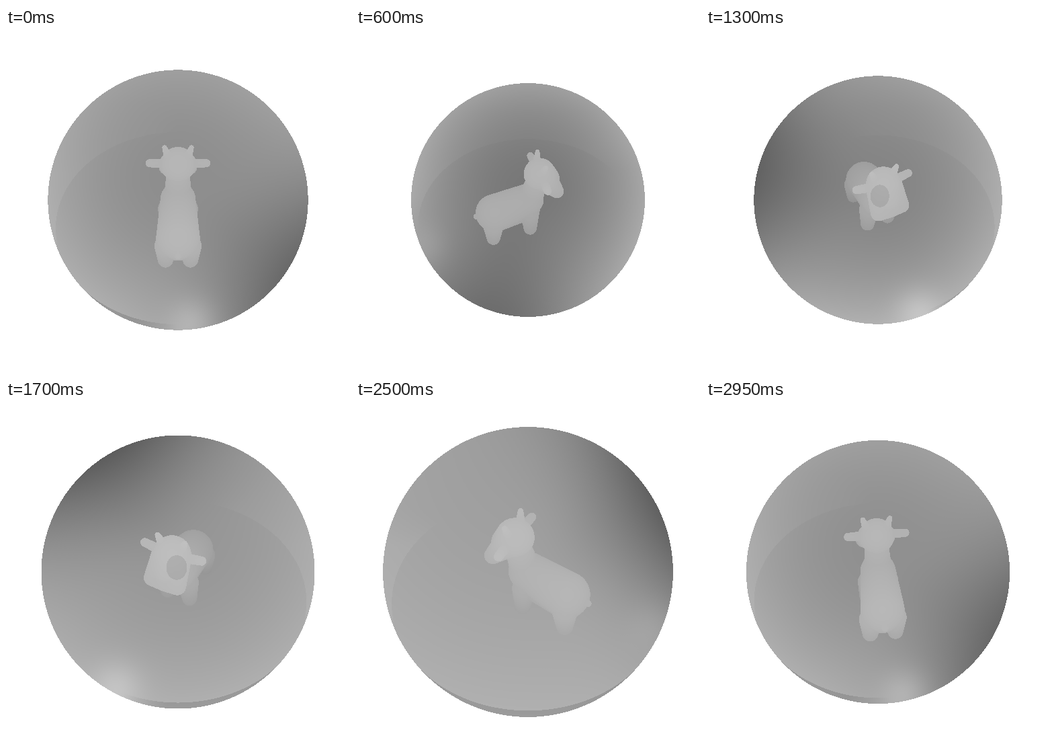
Recreate the animation shown at these times as an HTML page with a canvas. Size 512 by 512 pixels, loop 3 s.

```html
<!DOCTYPE html>
<html lang="en">
<head>
<meta charset="utf-8">
<title>Depth turntable</title>
<style>
html, body { margin: 0; width: 100%; height: 100%; overflow: hidden; background: #fff; }
canvas { display: block; width: 512px; height: 512px; }
</style>
</head>
<body>
<canvas id="stage" width="512" height="512"></canvas>
<script>
const SIZE = 512, MID = 256, LOOP = 3000, STEP = 50, BINS = 720;
const TAU = Math.PI * 2;
const ctx = document.getElementById('stage').getContext('2d');
const img = ctx.createImageData(SIZE, SIZE);
const px = new Uint32Array(img.data.buffer);
const depth = new Float32Array(SIZE * SIZE);

// Camera: fixed elevation, distance in model units
const ELEV = 51 * Math.PI / 180, SE = Math.sin(ELEV), CE = Math.cos(ELEV), DIST = 5;

const mix = (a, b, k) => a + (b - a) * k;
const clamp = (v, a, b) => Math.min(b, Math.max(a, v));
const ramp = (a, b, v) => clamp((v - a) / (b - a), 0, 1);
const grey = v => 0xff000000 | clamp(Math.round(v), 0, 255) * 0x10101;

// Each limb sweeps between two balls: side, up, forward, radius
const limbs = {
  back: [[0, .02, 0, .28], [0, -.12, -.63, .33]],
  belly: [[0, -.18, -.02, .25], [0, -.24, -.64, .28]],
  neck: [[0, .06, .05, .22], [0, .42, .15, .18]],
  head: [[0, .6, .2, .26], [0, .44, .34, .21]],
  cheek: [[.08, .56, .24, .2], [.19, .29, .45, .12]],
  muzzle: [[0, .29, .45, .13], [.19, .29, .45, .12]],
  ear: [[.2, .62, .2, .07], [.42, .64, .18, .06]],
  horn: [[.15, .78, .2, .06], [.19, .91, .22, .035]],
  foreleg: [[.16, -.2, -.02, .17], [.2, -.61, -.02, .125]],
  hindleg: [[.18, -.25, -.7, .18], [.2, -.61, -.74, .125]],
  tail: [[0, -.08, -.88, .06], [0, -.1, -.95, .05]]
};

const balls = [];
for (const [a, b] of Object.values(limbs)) {
  for (let i = 0; i <= 12; i++) {
    const p = a.map((v, j) => mix(v, b[j], i / 12));
    balls.push(p);
    if (p[0]) balls.push([-p[0], p[1], p[2], p[3]]);
  }
}

// Direction of every pixel from the middle, clockwise from the right
const bin = new Uint16Array(SIZE * SIZE);
for (let i = 0; i < bin.length; i++) {
  const dx = i % SIZE + .5 - MID, dy = Math.floor(i / SIZE) + .5 - MID;
  bin[i] = Math.floor((Math.atan2(dy, dx) / TAU + 1) * BINS) % BINS;
}
const rim = new Float32Array(BINS), raised = new Float32Array(BINS);

// Lighter behind the floor edge, darker in front of it
function lift(v) {
  return v < .3 ? 6 * ramp(-.75, -.2, v) : mix(6, -22, ramp(.3, .65, v));
}

function drawDome(turn, R) {
  const core = 142 - 23 * Math.sin(turn);
  for (let b = 0; b < BINS; b++) {
    const a = b / BINS * TAU - turn;
    const off = Math.atan2(Math.sin(a - .6), Math.cos(a - .6));
    rim[b] = 168 - 68 * Math.exp(-off * off / .65);
    raised[b] = clamp(-3 * Math.cos(a), 0, 1);
  }
  const glows = [turn + 1.45, turn - 1.5].map(a => ({
    x: .95 * Math.cos(a), y: .95 * Math.sin(a), k: 24 * Math.max(0, Math.sin(a))
  }));
  for (let y = 0, i = 0; y < SIZE; y++) {
    const v = (y + .5 - MID) / R, floorY = (v - .217) / .739;
    for (let x = 0; x < SIZE; x++, i++) {
      const u = (x + .5 - MID) / R, r2 = u * u + v * v, b = bin[i];
      if (r2 > 1) { px[i] = 0xffffffff; continue; }
      let g = mix(core, rim[b], r2) + 9 * v;
      if (u * u / .8836 + floorY * floorY > 1) g += raised[b] * lift(v);
      for (const s of glows) {
        const d = (u - s.x) ** 2 + (v - s.y) ** 2;
        if (s.k && d < .2) g += s.k * Math.exp(-d / .035);
      }
      px[i] = grey(g);
    }
  }
}

function drawCow(turn, R) {
  const c = Math.cos(turn), s = Math.sin(turn), unit = .48 * R;
  const spot = { x: MID + .03 * R * s, y: MID - .035 * R, k: 15 * ramp(.6, .85, -c) };
  depth.fill(-9);
  for (const [x, y, h, r] of balls) {
    const away = h * c - x * s;
    const near = y * SE - away * CE;
    const k = unit * DIST / (DIST - near), pr = r * k;
    const cx = MID + (x * c + h * s) * k, cy = MID - (y * CE + away * SE) * k;
    for (let py = Math.floor(cy - pr); py <= cy + pr; py++) {
      for (let qx = Math.floor(cx - pr); qx <= cx + pr; qx++) {
        const d = ((qx + .5 - cx) ** 2 + (py + .5 - cy) ** 2) / (pr * pr);
        if (d > 1) continue;
        const i = py * SIZE + qx, z = near + r * Math.sqrt(1 - d);
        if (z <= depth[i]) continue;
        depth[i] = z;
        const e = ((qx - spot.x) / (.076 * R)) ** 2 + ((py - spot.y) / (.09 * R)) ** 2;
        px[i] = grey(168 + 24 * z + (R - 193) * .15 - (e < 1 ? spot.k : 0));
      }
    }
  }
}

function draw(t) {
  const turn = t / LOOP * TAU;
  const R = 1 / (.005165 + .000615 * Math.sin(turn));
  drawDome(turn, R);
  drawCow(turn, R);
  ctx.putImageData(img, 0, 0);
}

const start = performance.now();
let last = 0;
function tick(now) {
  const t = Math.floor(Math.max(0, now - start) % LOOP / STEP) * STEP;
  if (t !== last) draw(last = t);
  requestAnimationFrame(tick);
}
draw(0);
requestAnimationFrame(tick);
</script>
</body>
</html>
```
